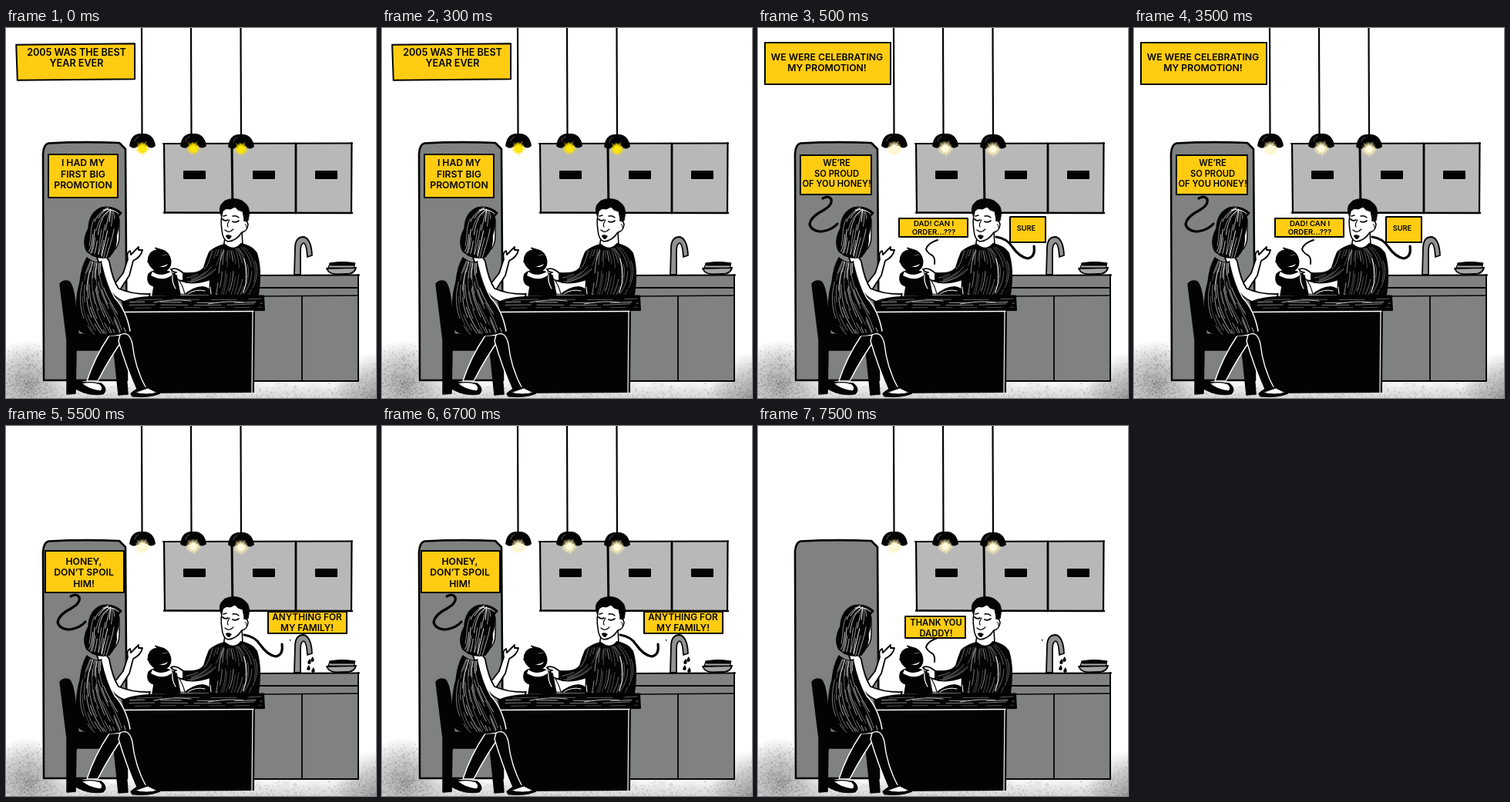
These frames come from a looping animation (480x480 px, 8 s). An HTML page with a canvas:

```html
<!DOCTYPE html>
<html lang="en">
<head>
<meta charset="utf-8">
<title>Kitchen comic</title>
<style>
html, body { margin: 0; width: 100%; height: 100%; overflow: hidden; background: #fff; }
canvas { display: block; width: 100vw; height: 100vh; }
</style>
</head>
<body>
<canvas id="stage" width="480" height="480"></canvas>
<script>
const ctx = document.getElementById('stage').getContext('2d');
const INK = '#030303', PAPER = '#fff', STEEL = '#7f8281', PALE = '#b8b8b8', GOLD = '#ffcc12';
const LOOP = 8000;

let seed = 1;
function rand() {
  seed = (seed * 16807) % 2147483647;
  return seed / 2147483647;
}

function shape(d, fill, line, width = 2) {
  const p = new Path2D(d);
  if (fill) { ctx.fillStyle = fill; ctx.fill(p); }
  if (line) { ctx.strokeStyle = line; ctx.lineWidth = width; ctx.stroke(p); }
}
const stroke = (d, width = 2, color = INK) => shape(d, null, color, width);
const inkLine = (x1, y1, x2, y2, width) => stroke(`M${x1} ${y1} L${x2} ${y2}`, width);

// Broken strokes blended between two cubic curves, kept inside a shape
function streaks(clip, a, b, count, width, color = PAPER) {
  ctx.save();
  ctx.clip(new Path2D(clip));
  ctx.strokeStyle = color;
  for (let i = 0; i < count; i++) {
    const t = (i + 0.3 + rand() * 0.4) / count;
    const c = a.map((v, k) => v + (b[k] - v) * t + (rand() - 0.5) * 3);
    ctx.lineWidth = width * (0.5 + rand() * 0.7);
    ctx.setLineDash([20 + rand() * 35, 6 + rand() * 16]);
    ctx.lineDashOffset = rand() * 40;
    ctx.beginPath();
    ctx.moveTo(c[0], c[1]);
    ctx.bezierCurveTo(c[2], c[3], c[4], c[5], c[6], c[7]);
    ctx.stroke();
  }
  ctx.restore();
}

function haze(x, y, r, alpha) {
  const g = ctx.createRadialGradient(x, y, 0, x, y, r);
  g.addColorStop(0, `rgba(95,95,95,${alpha})`);
  g.addColorStop(0.55, `rgba(110,110,110,${alpha * 0.55})`);
  g.addColorStop(1, 'rgba(130,130,130,0)');
  ctx.fillStyle = g;
  ctx.fillRect(x - r, y - r, 2 * r, 2 * r);
}

function floor() {
  haze(28, 462, 58, 0.6);
  haze(482, 478, 58, 0.65);
  for (let x = 80; x < 460; x += 40) haze(x, 488, 36, 0.32);
  for (let i = 0; i < 14000; i++) {
    const x = rand() * 480, y = 400 + rand() * 80;
    let top = 456;
    if (x < 60) top = 402 + 14 * Math.abs(x - 32) / 32;
    if (x > 440) top = 456 - (x - 440) * 0.75;
    if (rand() > (y - top) / 55) continue;
    ctx.fillStyle = rand() < 0.55 ? 'rgba(60,60,60,.22)' : 'rgba(255,255,255,.2)';
    ctx.fillRect(x, y, 1.3, 1.3);
  }
}

function fridge() {
  shape('M49 457 L48 163 Q49 151 55 149.5 Q100 147 147 149 L155 157 L157 457 Z', STEEL, INK, 2.6);
}

function cabinets() {
  ctx.fillStyle = PALE;
  ctx.fillRect(205, 150, 243, 90);
  inkLine(204, 150, 449, 149.5, 2.2);
  inkLine(205, 239.5, 449, 240, 2.4);
  inkLine(205, 150, 206, 240, 2.2);
  inkLine(448.5, 149, 448, 240, 2.2);
  inkLine(293, 150, 294, 240, 3);
  inkLine(376, 150, 376, 240, 2.8);
  for (const x of [231, 321, 402]) shape(`M${x} 186 h27 v9 h-27 Z`, INK, INK, 2);

  ctx.fillStyle = STEEL;
  ctx.fillRect(321, 321, 136, 137);
  inkLine(326, 321, 458, 320.5, 2.2);
  inkLine(323, 337, 457, 337, 1.8);
  inkLine(334, 348, 457, 347, 1.6);
  inkLine(457, 320, 457, 458, 2);
  inkLine(322, 458, 457, 458, 2);
  inkLine(384, 348, 384, 458, 1.8);
}

function sink(dripping) {
  shape('M374 320 L375 286 Q375 271 386 271 Q396 273 397 295 L391 297 Q390 280 386 279 Q382 280 382 290 L382 320 Z', '#929493', INK, 1.8);
  shape('M416 312 Q419 319 428 319.5 L445 319 Q453 317 454 311 Z', '#a5a5a5', INK, 1.8);
  shape('M420 306 L452 306 L452 311 L418 311 Z', '#aaa', INK, 1.2);
  shape('M420 305 Q436 302 453 305 L452 308 L421 308 Z', INK, INK, 1);
  if (!dripping) return;
  for (const [x, y] of [[393, 306], [397, 303], [392, 314], [398, 317]])
    shape(`M${x + 1} ${y - 4} Q${x + 5} ${y + 3} ${x} ${y + 3} Q${x - 4} ${y + 2} ${x + 1} ${y - 4} Z`, INK);
  shape('M368 277 h1.4 v1.4 h-1.4 Z', INK);
}

function lamp(cordX, x, y, warm) {
  inkLine(cordX, 0, cordX + 0.5, y + 2, 2.2);
  shape(`M${x - 17} ${y + 16} Q${x - 15} ${y + 1} ${x - 4} ${y} L${x + 4} ${y} Q${x + 15} ${y + 2} ${x + 17} ${y + 16} Q${x + 11} ${y + 21} ${x + 6} ${y + 16} Q${x} ${y + 19} ${x - 6} ${y + 17} Q${x - 12} ${y + 21} ${x - 17} ${y + 16} Z`, INK);
  stroke(`M${x - 10} ${y + 10} Q${x - 9} ${y + 5} ${x - 5} ${y + 4}`, 0.7, '#777');
  const cy = y + 19, r = warm ? 8.5 : 10;
  const glow = ctx.createRadialGradient(x, cy, 0, x, cy, r);
  const stops = warm
    ? [[0, '#fff36a'], [0.35, '#ffe900'], [0.6, 'rgba(255,225,0,.85)'], [1, 'rgba(255,225,0,0)']]
    : [[0, '#fff'], [0.35, '#fffdf0'], [0.55, 'rgba(255,240,170,.75)'], [1, 'rgba(255,240,170,0)']];
  for (const [at, color] of stops) glow.addColorStop(at, color);
  ctx.fillStyle = glow;
  ctx.beginPath();
  ctx.arc(x, cy, r, 0, 7);
  ctx.fill();
  for (let i = 0; i < 10; i++) {
    const a = i * Math.PI / 5 + 0.2, len = i % 2 ? 7 : 10;
    stroke(`M${x} ${cy} l${Math.cos(a) * len} ${Math.sin(a) * len}`, 0.6, warm ? '#ffe500' : '#fff6c8');
  }
}

function chair() {
  shape('M70 332 Q75 326 82 329 Q88 335 90 360 L94 397 L152 398 L158 475 L146 476 L140 418 L91 418 L90 474 L79 475 L79 405 Z', INK, INK, 1.5);
}

function table() {
  shape('M140 366 L323 366 L322 473 L172 474 Q165 420 156 396 Z', INK);
  const top = 'M150 352 Q180 346 334 347.5 L335 366 L154 367 Z';
  shape(top, INK, INK, 2);
  streaks(top, [160, 352, 200, 349, 270, 354, 332, 350], [160, 364, 210, 361, 270, 365, 332, 363], 4, 0.8, '#aaa');
  stroke('M192 356 Q215 351 240 354 M262 358 Q290 353 308 356', 1, '#bbb');
  stroke('M152 368.5 L321 367.5', 1.4, PAPER);
  stroke('M320 368 L319 473', 1.2, PAPER);
}

function man() {
  const sweater = 'M284 281 Q296 291 305 280 Q319 283 325 292 Q332 314 327 346 L264 346 L265 326 Q242 334 228 328 L229 318 Q250 320 257 311 Q260 300 264 291 Q271 284 284 281 Z';
  shape('M284 273 L282 284 Q296 291 307 281 L306 264 Z', PAPER, INK, 1.6);
  shape(sweater, INK, INK, 2);
  streaks(sweater, [268, 289, 262, 305, 260, 318, 234, 324], [284, 286, 280, 312, 268, 325, 238, 330], 5, 0.6, '#bbb');
  streaks(sweater, [281, 290, 272, 312, 276, 330, 270, 346], [310, 284, 338, 304, 328, 330, 318, 346], 14, 0.65, '#bbb');
  stroke('M309 299 Q316 321 308 343', 1, PAPER);
  shape('M230 318 Q221 310 214 313 Q216 317 221 317 Q215 319 218 324 Q222 328 230 328 Z', PAPER, INK, 1.8);
  shape('M231 346 Q241 336 255 335 Q265 336 270 346 Z', INK);
  stroke('M236 345 Q246 338 258 341 M265 336 L266 345', 1, PAPER);

  shape('M281 237 Q278 250 280 262 Q281 275 288 277 Q299 276 306 265 Q313 264 314 255 Q313 249 309 250 L309 234 Q292 228 281 237 Z', PAPER, INK, 1.6);
  shape('M279 243 Q275 232 281 227 L284 224 Q296 219 306 224 L311 228 Q318 234 314 250 L311 251 Q308 246 307 238 L301 236 L297 232 L291 235 L284 234 Q280 238 279 243 Z', INK, INK, 1);
  stroke('M281 248 Q284 251 288 249 M294 251 Q298 253 302 250', 1.8);
  stroke('M282 244 L286 243 M294 244 Q299 243 302 246', 1.4);
  stroke('M290 249 Q286 255 288 258 M284 262 Q289 267 295 261', 1.2);
  shape('M285 269 Q289 267 293 270 L290 274 Q286 274 285 269 Z', INK);
  stroke('M310 255 Q312 253 312 259', 1);
}

function child() {
  shape('M213 320 Q226 322 232 345 L218 346 Z', PAPER, INK, 1.2);
  shape('M185 319 Q195 311 211 316 L221 321 L226 346 L190 347 L192 335 Q181 332 185 319 Z', INK, INK, 1.5);
  shape('M190 316 Q200 324 214 316 L216 320 Q204 330 188 321 Z', PAPER);
  stroke('M216 321 Q215 330 220 338', 1.2, PAPER);
  shape('M184 303 Q184 289 196 288 L193 285 L200 287 Q212 289 214 302 Q215 314 202 317 Q189 316 184 303 Z', INK, INK, 1);
  shape('M198 309 Q204 310 210 306 Q207 312 198 309 Z', PAPER);
  stroke('M203 295 L209 294', 0.8, '#888');
}

function woman() {
  shape('M134 399 L156 398 Q134 428 119 458 L105 458 Q115 427 134 399 Z', INK, PAPER, 1.4);
  shape('M148 398 Q160 392 164 410 Q167 440 182 468 L170 472 Q156 440 146 406 Z', INK, PAPER, 1.4);
  shape('M80 457 Q92 456 104 460 L124 461 Q133 469 126 475 Q108 478 92 469 Q82 465 80 457 Z', INK, INK, 1);
  shape('M98 461 Q112 458 122 462 Q127 467 123 471 Q108 470 98 461 Z', PAPER, INK, 1.2);
  shape('M162 474 Q174 462 187 468 L200 474 Q188 480 164 478 Z', INK, INK, 1);
  shape('M167 473 L184 467 L196 473 Q183 477 167 473 Z', PAPER, INK, 1);

  shape('M141 332 L152 318 L158 300 Q156 291 161 289 L162 294 L172 284 L172 288 L177 288 Q175 297 165 302 L160 321 L147 341 Z', PAPER, INK, 1.8);
  shape('M118 298 Q130 293 134 303 Q138 326 146 338 Q165 346 187 345 L185 349 Q166 350 153 355 Q139 350 132 334 Z', PAPER, INK, 1.8);

  const dress = 'M105 298 Q116 307 124 303 Q130 330 140 349 Q155 365 160 393 Q140 400 118 399 Q96 398 91 386 Q90 350 96 330 Q98 310 105 298 Z';
  shape(dress, INK, INK, 1.5);
  streaks(dress, [108, 302, 92, 335, 88, 370, 112, 397], [122, 305, 122, 345, 148, 360, 157, 394], 15, 0.75, '#ccc');
  stroke('M125 304 Q131 332 141 350 Q156 366 161 393', 1.5, PAPER);

  shape('M140 245 L147 248 L147 270 Q147 284 138 290 Z', PAPER, INK, 1.4);
  const hair = 'M105 290 Q98 277 107 260 Q108 239 124 233 Q139 230 150 240 L146 244 Q147 258 143 270 Q145 285 134 297 Q123 300 112 295 Z';
  shape(hair, INK, INK, 1.5);
  streaks(hair, [132, 234, 98, 244, 114, 268, 104, 290], [138, 237, 146, 258, 134, 280, 132, 298], 11, 1);
  stroke('M126 236 Q140 234 146 241', 1, PAPER);
}

const TAILS = {
  woman: 'M84 221 Q91 217 95 222 Q97 230 84 237 Q68 245 67 255 Q70 264 83 264 Q96 262 103 254',
  man: 'M309 271 Q323 273 330 284 Q339 297 350 299 Q360 297 358 283',
  child: 'M233 275 Q220 279 218 287 Q220 292 226 295 Q230 298 229 306'
};

function caption({ box: [x, y, r, b], cx, base, lines, size = 12.2, step = 14, skew = 0 }) {
  shape(`M${x - skew} ${y + skew} L${r} ${y - skew} L${r} ${b - skew} L${x + skew} ${b + skew} Z`, GOLD, INK, 2);
  ctx.fillStyle = INK;
  ctx.font = `600 ${size}px Inter, "Open Sans", sans-serif`;
  ctx.textAlign = 'center';
  lines.forEach((line, i) => ctx.fillText(line, cx, base + i * step));
}

const SCENES = [
  { from: 0, warm: true, tails: [], captions: [
    { box: [14, 21, 167, 67], cx: 91.5, base: 36, lines: ['2005 WAS THE BEST', 'YEAR EVER'], size: 12.6, skew: 0.8 },
    { box: [55, 164, 145, 220], cx: 100, base: 179, step: 14.5, lines: ['I HAD MY', 'FIRST BIG', 'PROMOTION'] }
  ] },
  { from: 500, tails: ['woman', 'child', 'man'], captions: [
    { box: [9, 19, 172, 73], cx: 89.5, base: 42, lines: ['WE WERE CELEBRATING', 'MY PROMOTION!'] },
    { box: [55, 165, 147, 216], cx: 102, base: 179, step: 13.7, size: 11.2, lines: ['WE’RE', 'SO PROUD', 'OF YOU HONEY!'] },
    { box: [183, 247, 272, 271], cx: 228, base: 257, step: 11, size: 9.6, lines: ['DAD! CAN I', 'ORDER...???'] },
    { box: [327, 245, 373, 278], cx: 348, base: 263, size: 9.2, lines: ['SURE'] }
  ] },
  { from: 5500, drip: true, tails: ['woman', 'man'], captions: [
    { box: [51, 162, 153, 216], cx: 101, base: 179.5, step: 14.5, lines: ['HONEY,', 'DON’T SPOIL', 'HIM!'] },
    { box: [340, 241, 442, 269], cx: 390.5, base: 252, size: 11.8, lines: ['ANYTHING FOR', 'MY FAMILY!'] }
  ] },
  { from: 7500, drip: true, tails: ['child'], captions: [
    { box: [191, 247, 269, 275], cx: 231, base: 259, step: 13.5, size: 11.2, lines: ['THANK YOU', 'DADDY!'] }
  ] }
];

function draw(scene) {
  seed = 4711;
  ctx.lineCap = ctx.lineJoin = 'round';
  ctx.fillStyle = PAPER;
  ctx.fillRect(0, 0, 480, 480);
  floor();
  fridge();
  cabinets();
  sink(scene.drip);
  lamp(176, 177, 137, scene.warm);
  lamp(240, 243, 137, scene.warm);
  lamp(304.5, 305, 138, scene.warm);
  for (const name of scene.tails) stroke(TAILS[name], name === 'child' ? 2 : 3.2);
  man();
  child();
  chair();
  table();
  woman();
  scene.captions.forEach(caption);
}

const start = performance.now();
let shown = null;
function tick() {
  const t = (performance.now() - start) % LOOP;
  const scene = SCENES.filter(s => s.from <= t).pop();
  if (scene !== shown) draw(shown = scene);
  requestAnimationFrame(tick);
}
tick();
</script>
</body>
</html>
```
